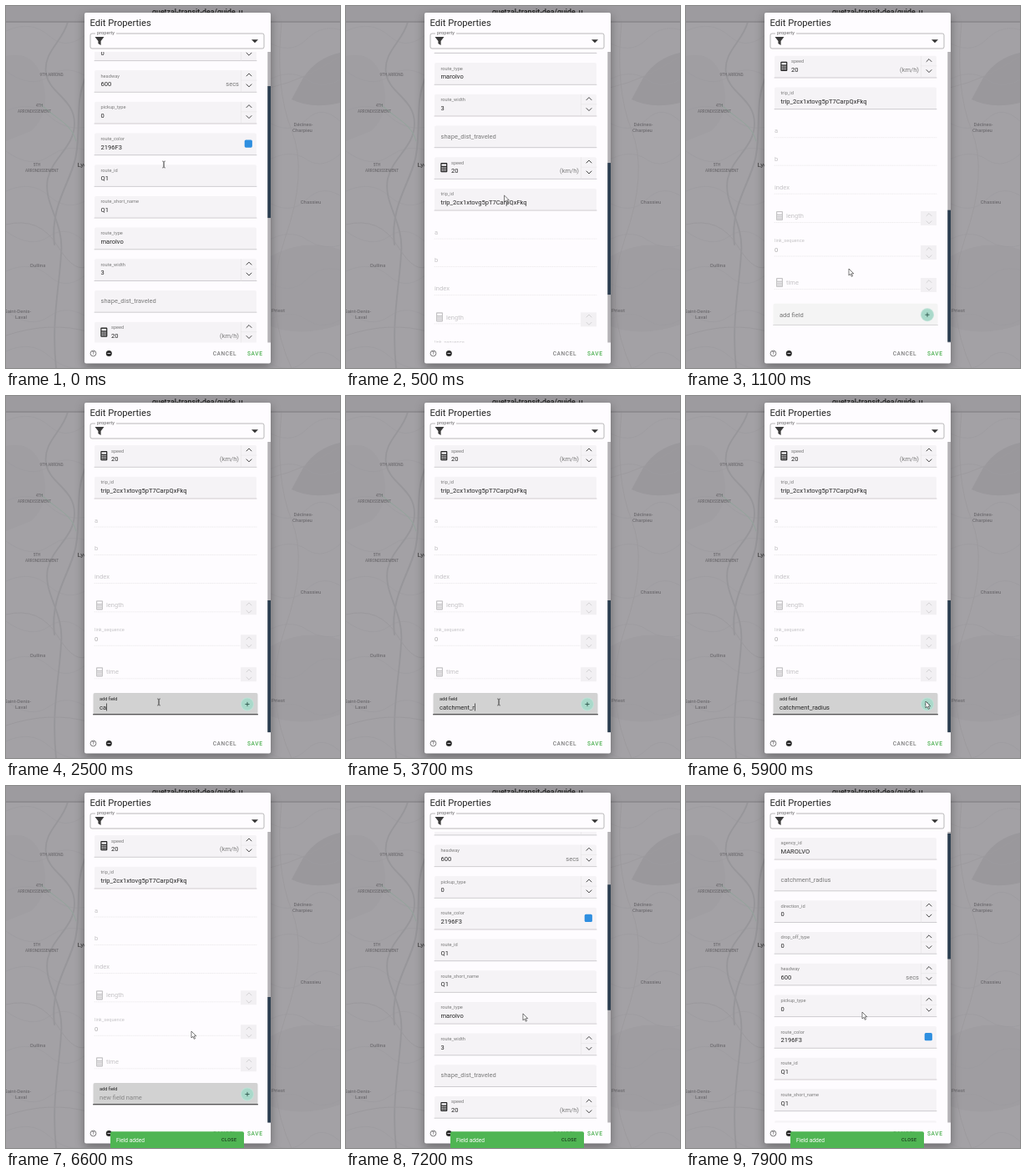
Write an HTML page that moves like this. It is 400 px wide and 434 px high and loops after 8000 ms.

```html
<!DOCTYPE html>
<html lang="en">
<head>
<meta charset="utf-8">
<title>Edit Properties</title>
<style>
html, body { margin: 0; height: 100%; overflow: hidden; background: #a3a1a5; }
svg { display: block; width: 100vw; height: 100vh; font-family: Roboto, Arial, sans-serif; }
text { white-space: pre; }
.line { fill: none; stroke-linecap: round; stroke-linejoin: round; }
#dialog { filter: drop-shadow(0 4px 6px rgba(0, 0, 0, .35)); }
</style>
</head>
<body>
<svg id="stage" viewBox="0 0 400 434"></svg>
<script>
const LOOP = 8000, PITCH = 37.7, TOP = 61.9, END = 417.5;
const INK = '#242424', GREY = '#7a7a7a', FAINT = '#c4c3c5', PAPER = '#fefcff', FILL = '#f5f3f6';
const FOCUS = 1800, TYPE = 2240, KEY = 130, WORD = 'catchment_radius', ADDED = 6000;

const text = (x, y, s, size = 7.55, fill = INK, more = '') =>
  `<text x="${x}" y="${y + size * .35}" font-size="${size}" fill="${fill}" ${more}>${s}</text>`;
const rect = (x, y, w, h, fill, r = 0, more = '') =>
  `<rect x="${x}" y="${y}" width="${w}" height="${h}" rx="${r}" fill="${fill}" ${more}/>`;
const line = (d, color, width = .6, more = '') =>
  `<path class="line" d="${d}" stroke="${color}" stroke-width="${width}" ${more}/>`;
const group = (id, body, more = '') => `<g id="${id}" ${more}>${body}</g>`;

const chevrons = (x, y1, y2, color) =>
  line(`M${x - 3} ${y1 + 1.6}l3 -3l3 3M${x - 3} ${y2 - 1.6}l3 3l3 -3`, color, .9);

function calculator(x, y, color, hole) {
  let s = rect(x - 4, y - 5.6, 8, 11.2, color, 1) + rect(x - 2.8, y - 4.3, 5.6, 2.4, hole);
  for (let i = 0; i < 9; i++)
    s += rect(x - 2.7 + i % 3 * 2, y - .7 + (i / 3 | 0) * 1.9, 1.3, 1.2, hole);
  return s;
}

function field(y, { label, value, unit, spin, calc, swatch }) {
  const x = calc ? 126 : 113.5;
  let s = `<path d="M106 ${y + 26.4}v-24.4q0 -2 2 -2h190q2 0 2 2v24.4z" fill="${FILL}"/>` +
    line(`M106 ${y + 26.2}h194`, '#a5a3a6', .5);
  s += value === undefined
    ? text(x, y + 12.4, label, 7.55, GREY)
    : text(x, y + 6.5, label, 5.66, GREY) + text(x, y + 16.5, value);
  if (calc) s += calculator(117.3, y + 12.5, INK, FILL);
  if (unit) s += text(279, y + 16.5, unit, 7.55, GREY, 'text-anchor="end"');
  if (spin) s += line(`M281.5 ${y + .5}v25.6M281.5 ${y + 12}h18.5`, '#e2e0e3', .5) +
    chevrons(291, y + 5.2, y + 18.4, '#333');
  if (swatch) s += rect(285.7, y + 8, 9.2, 9.2, swatch, 1.6);
  return s;
}

const rows = [
  { label: 'direction_id', value: 0, spin: 1 },
  { label: 'drop_off_type', value: 0, spin: 1 },
  { label: 'headway', value: 600, unit: 'secs', spin: 1 },
  { label: 'pickup_type', value: 0, spin: 1 },
  { label: 'route_color', value: '2196F3', swatch: '#2f8fe0' },
  { label: 'route_id', value: 'Q1' },
  { label: 'route_short_name', value: 'Q1' },
  { label: 'route_type', value: 'marolvo' },
  { label: 'route_width', value: 3, spin: 1 },
  { label: 'shape_dist_traveled' },
  { label: 'speed', value: 20, unit: '(km/h)', spin: 1, calc: 1 },
  { label: 'trip_id', value: 'trip_2cx1xtovg5pT7CarpQxFkq' }
];

// Read-only rows, placed as seen when scrolled to the end
function disabled(y, label, calc, value) {
  let s = line(`M106 ${y + 8}h${calc || value ? 174 : 194}`, '#dedcdf', .5, 'stroke-dasharray=".8 1.4"');
  if (calc) s += calculator(112, y, FAINT, PAPER);
  if (value) s += text(106, y - 10.8, label, 5.66, FAINT) + text(106, y, value, 7.55, '#aaa');
  else s += text(calc ? 120 : 106, y, label, 7.55, FAINT);
  if (calc || value) {
    const top = value ? y - 5 : y - 5.5;
    s += rect(281, top, 19, 17, '#f2f0f3') + chevrons(291, top + 4, top + 13.5, '#d0ced1');
  }
  return s;
}

const addField =
  rect(104.5, 356.5, 197, 26, FILL, 2, 'id="addBox"') +
  line('M104.5 382.3h197', '#a5a3a6', .6, 'id="addLine"') +
  '<text id="addLabel" x="112">add field</text>' +
  text(112, 373.5, '', 7.55, INK, 'id="addText"') +
  rect(0, 369, .7, 9, INK, 0, 'id="caret"') +
  '<circle cx="289" cy="370" r="8" fill="#bfe2d7"/><circle cx="289" cy="370" r="7" fill="#a9d9ca"/>' +
  line('M286.8 370h4.4M289 367.8v4.4', '#2f5a4f', .9);

const list = group('list',
  field(TOP, { label: 'agency_id', value: 'MAROLVO' }) +
  group('extra', field(TOP + PITCH, { label: WORD })) +
  group('rest',
    rows.map((r, i) => field(TOP + PITCH * (i + 1), r)).join('') +
    `<g transform="translate(0 ${END - .5})">` +
    disabled(149.5, 'a') + disabled(183, 'b') + disabled(217, 'index') +
    disabled(251.3, 'length', 1) + disabled(291.8, 'link_sequence', 0, '0') +
    disabled(331.3, 'time', 1) + addField + '</g>'));

const place = (x, y, s, size = 6) => text(x, y, s, size, '#626064', 'text-anchor="middle"');

function backdrop() {
  let s = rect(0, 0, 400, 434, '#a3a1a5');
  // Park and built-up areas
  s += '<path d="M400 56q-28 6 -44 30l-14 26q24 12 58 4z" fill="#9a989c"/>' +
    '<path d="M317 300q40 -22 83 -8v90q-46 16 -83 2z" fill="#9f9da1"/>' +
    '<path d="M0 60q34 -8 44 30t-14 60l-30 12z" fill="#a09ea2"/>';
  // Minor roads
  for (let i = 0; i < 9; i++) {
    const y = 30 + i * 48;
    s += line(`M0 ${y}q30 ${i % 2 ? 22 : -14} 52 6t48 ${i % 3 * 9 - 6}`, '#9d9b9f', .7);
    s += line(`M312 ${y + 12}q28 ${i % 2 ? -16 : 18} 48 -2t44 ${i % 3 * 8 - 10}`, '#9d9b9f', .7);
  }
  s += line('M330 19q-8 80 12 130t-8 130t10 160M400 60q-40 28 -84 38', '#9c9a9e', .9);
  s += line('M74 19c-6 24 -30 36 -26 62c4 24 34 30 34 60c0 28 -26 40 -32 66c-6 30 20 52 16 90c-2 40 -12 80 -6 137', '#97969a', 1.8);
  s += line('M96 84c-14 30 -6 60 -12 94c-4 30 -32 60 -26 108', '#97969a', 2);
  s += line('M42 118c18 18 36 22 42 44', '#95a39d', 1.1);
  s += line('M0 262q40 -10 62 26t38 22M0 395q54 -18 100 -4', '#9b999d', 1);
  s += place(55, 82, '9TH ARROND.', 4.6) + place(40, 119, '4TH', 4.6) + place(34, 126, 'ARRONDISSEMENT', 4.6) +
    place(37, 190, '5TH', 4.6) + place(43, 197, 'ARRONDISSEMENT', 4.6) +
    text(85.5, 190, 'Lyon', 8, '#3c3c3c') +
    place(356, 141.5, 'Décines-') + place(355, 149, 'Charpieu') + place(365, 235, 'Chassieu') +
    place(38, 311, 'Oullins', 6.2) + place(14, 365.5, 'Saint-Denis-') + place(18, 373, 'Laval') +
    place(326, 365, 'Priest', 6.2);
  s += rect(0, 18, 400, 2, '#8e8c90') + rect(0, 0, 400, 18, '#9d9b9f');
  return s + text(175, 7, 'quetzal-transit-dea/guide_u', 8.8, '#222', 'font-weight="500"');
}

const button = (x, s, color) =>
  text(x, 416.3, s, 6.6, color, 'font-weight="500" letter-spacing=".59"');

document.getElementById('stage').innerHTML =
  '<clipPath id="view"><rect x="94" y="55" width="223" height="348.5"/></clipPath>' +
  backdrop() +
  rect(94, 8, 223, 420.5, PAPER, 2, 'id="dialog"') +
  text(100.5, 20, 'Edit Properties', 11.2) +
  rect(101, 33, 208, 18, 'none', 2, 'stroke="#8c8c8c" stroke-width=".6"') +
  rect(107, 31, 25, 4, PAPER) + text(109, 32.4, 'property', 5.66, '#666') +
  '<path d="M106.5 37h11l-3.9 5v5l-3.2 -2v-3z" fill="#3a3a3a"/><path d="M294 40.2h8l-4 4z" fill="#333"/>' +
  group('scroller', list, 'clip-path="url(#view)"') +
  rect(313.3, 55, 3.7, 348.5, '#b3b1b5') + rect(313.3, 96, 3.7, 157, '#2c3e50', 0, 'id="thumb"') +
  '<circle cx="104.5" cy="416.5" r="3.4" fill="none" stroke="#444" stroke-width=".7"/>' +
  text(104.5, 416.5, '?', 5, '#444', 'text-anchor="middle" font-weight="500"') +
  '<circle cx="123.3" cy="416.5" r="3.5" fill="#2a2a2a"/>' + line('M121.8 416.5h3', PAPER, .8) +
  button(247.7, 'CANCEL', '#7d7d7d') + button(289, 'SAVE', '#4caf50') +
  group('snack', rect(125, 414.3, 160, 22, '#4fb553', 2) +
    text(132, 424.3, 'Field added', 6.6, '#fff') +
    text(258, 424.5, 'CLOSE', 5.4, '#1d3b1f', 'font-weight="500" letter-spacing=".45"')) +
  group('mouse',
    group('beam', line('M-1.6 -4q1.6 0 1.6 1v6q0 1 -1.6 1M1.6 -4q-1.6 0 -1.6 1v6q0 1 1.6 1', '#333', .6)) +
    group('arrow', '<path d="M-2 -4v8l1.9 -1.7l1.4 3l1.3 -.6l-1.4 -2.9h2.6z" fill="#fff" stroke="#222" stroke-width=".6"/>'));

const $ = Object.fromEntries([...document.querySelectorAll('[id]')].map(e => [e.id, e]));
const set = (e, attrs) => { for (const k in attrs) e.setAttribute(k, attrs[k]); };
const show = (e, on) => set(e, { visibility: on ? 'visible' : 'hidden' });
const move = (e, x, y) => set(e, { transform: `translate(${x} ${y})` });
const clamp = v => Math.max(0, Math.min(1, v));
const smooth = p => p * p * (3 - 2 * p);
const easeOut = p => 1 - (1 - p) ** 2;

// Keys are [time, value]; the ease applies to each span
function track(t, keys, ease = p => p) {
  let v = keys[0][1];
  for (let i = 1; i < keys.length; i++) {
    const [a, from] = keys[i - 1], [b, to] = keys[i];
    if (t >= a) v = from + (to - from) * ease(clamp((t - a) / (b - a)));
  }
  return v;
}

const mouseX = [[0, 189], [200, 189], [1000, 197], [1200, 197], [1700, 183], [5450, 183], [5800, 289], [6050, 289], [6500, 224], [6600, 224], [7100, 214], [7900, 213]];
const mouseY = [[0, 190], [200, 190], [1000, 319], [1200, 319], [1700, 367], [5450, 367], [5800, 370], [6050, 370], [6500, 298], [6600, 298], [7100, 277], [7900, 275]];

function draw(t) {
  const added = t >= ADDED;
  const max = END + (added ? PITCH : 0);
  const scroll = added
    ? track(t, [[6650, max], [7200, 143], [7600, 0]], p => t < 7200 ? p : easeOut(p))
    : track(t, [[100, 97.9], [1150, END]], easeOut);
  move($.list, 0, -scroll);
  move($.rest, 0, added ? PITCH : 0);
  show($.extra, added);
  set($.thumb, added
    ? { y: 253 - (max - scroll) * .4306, height: 150.5 }
    : { y: 245 - (max - scroll) * .466, height: 158 });

  const focus = smooth(clamp((t - FOCUS) / 150));
  const shade = Math.round(244 - 34 * focus), ink = Math.round(117 - 85 * focus);
  const size = 7.55 - 1.89 * focus;
  set($.addBox, { fill: `rgb(${shade},${shade},${shade})` });
  set($.addLine, { stroke: focus ? '#222' : '#c4c4c4', 'stroke-width': .6 + .4 * focus });
  set($.addLabel, { y: 369.8 - 6.2 * focus + size * .35, 'font-size': size, fill: `rgb(${ink},${ink},${ink})` });

  const count = Math.max(0, Math.min(WORD.length, Math.floor((t - TYPE) / KEY)));
  const typed = added ? '' : WORD.slice(0, count);
  $.addText.textContent = typed || (focus === 1 ? 'new field name' : '');
  set($.addText, { fill: typed ? INK : '#858585' });
  const typedAt = TYPE + KEY * WORD.length;
  show($.caret, t >= FOCUS && !added && (t < typedAt || (t - typedAt) % 1000 < 500));
  set($.caret, { x: 112.2 + (typed ? $.addText.getComputedTextLength() : 0) });

  set($.snack, { opacity: clamp((t - ADDED - 50) / 150) });
  move($.mouse, track(t, mouseX, smooth), track(t, mouseY, smooth));
  const beam = t < 300 || (t > 1550 && t < 5750);
  show($.beam, beam);
  show($.arrow, !beam);
}

const start = performance.now();
function tick() {
  draw((performance.now() - start) % LOOP);
  requestAnimationFrame(tick);
}
tick();
</script>
</body>
</html>
```
